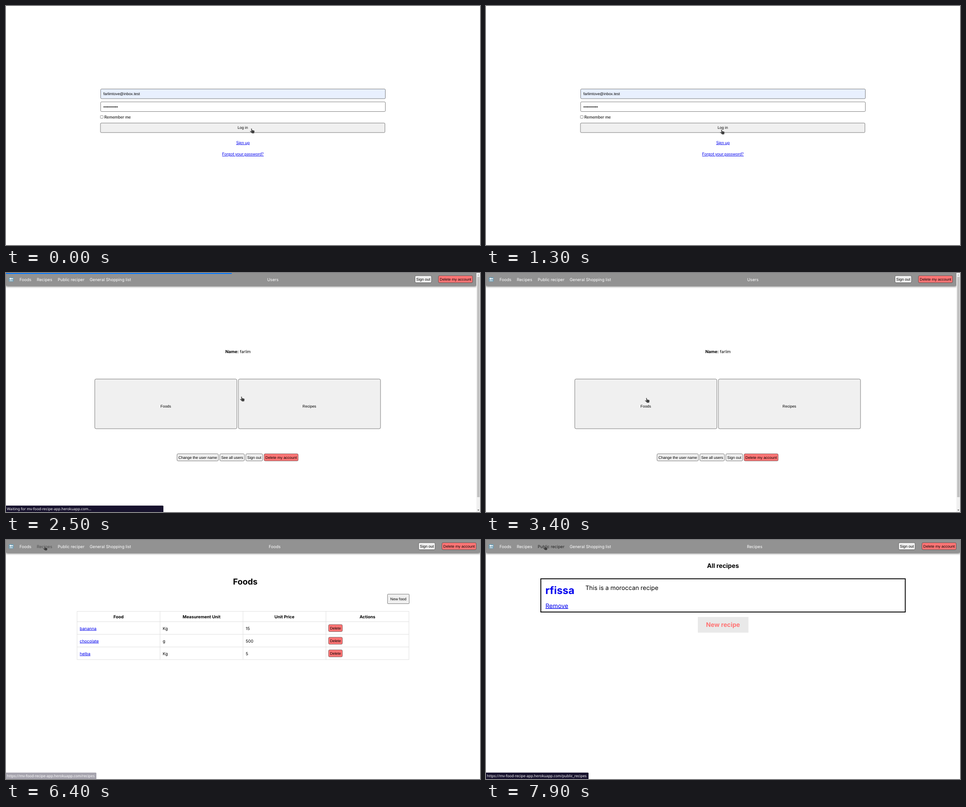
Write an HTML page that moves like this. It is 1054x531 px and loops after 8000 ms.

```html
<!DOCTYPE html>
<html lang="en">
<head>
<meta charset="utf-8">
<title>Recipe app walkthrough</title>
<style>
  html, body { margin: 0; width: 100%; height: 100%; overflow: hidden; background: #fff; }
  svg { display: block; width: 1054px; height: 531px; }
  text { text-rendering: geometricPrecision; white-space: pre; }
  .ui { font: 8.45px "Liberation Sans", Arial, sans-serif; }
  .form { font: 9.3px Lato, sans-serif; }
  .body { font: 9.15px Inter, sans-serif; }
  .strong { font: bold 9.35px Inter, sans-serif; }
  .title { font: bold 18.3px Inter, sans-serif; }
  .large { font: 13.35px Inter, sans-serif; }
  .heading { font: bold 13.75px Inter, sans-serif; }
  .dish { font: bold 23px Inter, sans-serif; }
  .status { font: 8.1px "Noto Sans", sans-serif; }
  .link { fill: #00e; text-decoration: underline; }
</style>
</head>
<body>
<svg id="stage" viewBox="0 0 1054 531">
  <defs>
    <filter id="shadow" x="-5%" y="-50%" width="110%" height="250%" color-interpolation-filters="sRGB">
      <feDropShadow dx="0" dy="1.9" stdDeviation="1.9" flood-color="#000" flood-opacity=".6"/>
    </filter>
  </defs>
</svg>
<script>
const LOOP = 8000;
const RED = '#ff7575', GREY = '#f0f0f0', BLUE = '#00e';
const SITE = 'mv-food-recipe-app.herokuapp.com';
const stage = document.getElementById('stage');

function add(parent, tag, attrs = {}, content) {
  const node = document.createElementNS('http://www.w3.org/2000/svg', tag);
  for (const key in attrs) node.setAttribute(key, attrs[key]);
  if (content !== undefined) node.textContent = content;
  return parent.appendChild(node);
}
const group = (parent = stage) => add(parent, 'g');
const text = (parent, x, y, content, cls, attrs = {}) =>
  add(parent, 'text', { x, y, class: cls, ...attrs }, content);
const centered = (parent, x, y, content, cls, attrs = {}) =>
  text(parent, x, y, content, cls, { 'text-anchor': 'middle', ...attrs });
const box = (parent, x, y, width, height, fill, attrs = {}) =>
  add(parent, 'rect', { x, y, width, height, fill, ...attrs });
const framed = (parent, x, y, w, h, fill, stroke = '#333', rx = 2) =>
  box(parent, x, y, w, h, fill, { stroke, rx, 'stroke-width': 0.64 });

function button(parent, x, y, w, h, label, fill = GREY, rx = 2.5) {
  framed(parent, x, y, w, h, fill, '#333', rx);
  centered(parent, x + w / 2, y + h / 2 + 3, label, 'ui');
}

function loginPage() {
  const page = group();
  framed(page, 210.5, 184.4, 633, 21.5, '#e8f0fe');
  text(page, 216.5, 198, 'farlimtove@inbox.test', 'ui');
  framed(page, 210.5, 213, 633, 21.5, '#fff');
  text(page, 216.5, 226.8, '•'.repeat(11), 'ui');
  framed(page, 209.9, 243.4, 6.2, 6.2, '#fff', '#555', 1.2);
  text(page, 218.6, 250.2, 'Remember me', 'form');
  const submit = framed(page, 210, 260, 632.6, 21.2, GREY);
  centered(page, 526.4, 273.4, 'Log in', 'ui');
  centered(page, 526.9, 306.6, 'Sign up', 'form link');
  centered(page, 526.8, 332, 'Forgot your password?', 'form link');
  return { page, submit };
}

function navBar(parent, width, title) {
  const shift = width - 1054;
  const clip = add(parent, 'svg', { width: 1054, height: 40 });
  box(clip, 0, 0, width, 28, '#929292', { filter: 'url(#shadow)' });
  box(clip, 6, 9.2, 11, 10, '#6f9db3', { rx: 1.5 });
  add(clip, 'path', { d: 'M7.2 12.8 L10.6 10.2 V11.8 H15.6 V13.8 H10.6 V15.4 Z M8 16.5 H15 V17.8 H8 Z', fill: '#fff' });
  const links = [[30, 'Foods'], [68.5, 'Recipes'], [115, 'Public reciper'], [186, 'General Shopping list']]
    .map(([x, label]) => text(clip, x, 17.5, label, 'body', { fill: '#fff' }));
  centered(clip, 597.4 + shift / 2, 17.5, title, 'body', { fill: '#fff' });
  button(clip, 917.5 + shift, 6, 36.6, 15.6, 'Sign out');
  button(clip, 969.5 + shift, 6, 76, 15.6, 'Delete my account', RED);
  return { recipes: links[1], publicLink: links[2] };
}

function homePage() {
  const page = group();
  navBar(page, 1046, 'Users');
  box(page, 1046, 0, 8, 531, '#f1f1f1');
  box(page, 1047.6, 8.5, 5.6, 489.5, '#c1c1c1');
  add(page, 'path', { d: 'M1048.2 5.4 L1050.3 3 L1052.4 5.4 Z', fill: '#a3a3a3' });
  add(page, 'path', { d: 'M1048.2 525.8 L1050.3 528.2 L1052.4 525.8 Z', fill: '#505050' });
  text(page, 487.7, 178, 'Name:', 'strong');
  text(page, 520, 178, 'farlim', 'body');
  button(page, 197.4, 235.6, 316, 110.4, '', GREY, 3);
  button(page, 516.8, 235.6, 316, 110.4, '', GREY, 3);
  centered(page, 355.3, 298.6, 'Foods', 'ui');
  centered(page, 674.6, 298.6, 'Recipes', 'ui');
  button(page, 380.3, 401.7, 92, 15.8, 'Change the user name');
  button(page, 475.4, 401.7, 54.8, 15.8, 'See all users');
  button(page, 533.3, 401.7, 37.4, 15.8, 'Sign out');
  button(page, 573.9, 401.7, 75.8, 15.8, 'Delete my account', RED);
  return { page };
}

function foodsPage() {
  const page = group();
  const nav = navBar(page, 1054, 'Foods');
  centered(page, 532, 99, 'Foods', 'title');
  button(page, 848.3, 120.3, 48.3, 21.2, 'New food', GREY, 1.5);

  const left = 158, column = 184.5, rows = [158.5, 181.5, 209.6, 237.7, 265.8];
  const grid = rows.map(y => `M${left} ${y}h${column * 4}`).join('') +
    [0, 1, 2, 3, 4].map(i => `M${left + i * column} 158.5V265.8`).join('');
  add(page, 'path', { d: grid, stroke: '#ddd', 'stroke-width': 0.9, fill: 'none' });
  ['Food', 'Measurement Unit', 'Unit Price', 'Actions'].forEach((label, i) =>
    centered(page, left + column * (i + 0.5), 173.5, label, 'strong'));
  [['bananna', 'Kg', '15'], ['chocolate', 'g', '500'], ['helba', 'Kg', '5']].forEach((cells, r) => {
    const y = 199.5 + r * 28.1;
    cells.forEach((cell, i) => text(page, left + 6 + i * column, y, cell, i ? 'body' : 'body link'));
    button(page, 717.2, y - 11.6, 30.8, 15.6, 'Delete', RED);
  });
  return { page, ...nav };
}

function recipesPage() {
  const page = group();
  const nav = navBar(page, 1054, 'Recipes');
  centered(page, 527, 61.5, 'All recipes', 'heading');
  box(page, 121.9, 86.2, 810.4, 73.8, 'none', { stroke: '#000', 'stroke-width': 1.9 });
  text(page, 132, 120, 'rfissa', 'dish', { fill: BLUE });
  text(page, 221, 111, 'This is a moroccan recipe', 'large');
  text(page, 132.2, 150.5, 'Remove', 'large link');
  box(page, 471, 171, 112.6, 34.8, '#e9e9e9');
  centered(page, 527, 193.4, 'New recipe', 'heading', { fill: RED });
  return { page, ...nav };
}

const login = loginPage(), home = homePage(), foods = foodsPage(), recipes = recipesPage();

const progress = box(stage, 0, 0, 0, 2, '#0076ff');
const status = group();
const statusBox = box(status, -4, 516.8, 0, 20, '#17122d', { rx: 1.5 });
const statusText = text(status, 2, 527.2, '', 'status', { fill: '#fff' });

const pointers = {
  hand: 'M2.9 .9 Q3.9 -.1 4.8 .9 L5.2 4 L9.4 4.9 Q10.7 5.3 10.6 6.8 L10.3 9.2 L9.6 11.2 H4.8 L3.9 9.8 L.5 7 Q.3 5.7 1.7 5.9 L3.5 6.9 Z',
  arrow: 'M.3 .3 L.3 9 L2.4 7.1 L4 10.8 L5.6 10.1 L4.1 6.6 L6.8 6.4 Z'
};
const cursor = add(stage, 'path', { fill: '#3f3f3f', stroke: '#ddd', 'stroke-width': 0.45, 'stroke-opacity': 0.8 });

// Each track lists [start time, ...values]; values hold until the next entry.
const pageTrack = [[0, login], [2400, home], [3800, foods], [6900, recipes]];
const cursorTrack = [
  [0, 542, 271.7, 'hand'], [400, 538, 272.2, 'hand'], [500, 530, 273, 'hand'],
  [600, 523, 273.7, 'hand'], [700, 519.8, 274, 'hand'],
  [3100, 355, 277.7, 'hand'], [3400, 353, 277, 'hand'],
  [3800, 357, 278, 'arrow'], [4200, 432, 199, 'arrow'], [4500, 339, 109, 'arrow'],
  [4700, 306, 188, 'arrow'], [5000, 306, 204, 'arrow'], [5500, 210, 67.5, 'arrow'],
  [5700, 167, 38.5, 'arrow'], [5900, 138, 13, 'hand'], [6200, 93, 16, 'arrow'],
  [6400, 81.7, 12.4, 'hand'], [7400, 107, 17, 'arrow'], [7700, 126.2, 11.6, 'hand']
];
const statusTrack = [
  [0, 0, 0, ''],
  [2400, 1, 350, `Waiting for ${SITE}...`],
  [2700, 0.4, 350, `Waiting for ${SITE}...`],
  [2900, 0, 0, ''],
  [6400, 0.38, 201, `https://${SITE}/recipes`],
  [6700, 1, 201, `https://${SITE}/recipes`],
  [7700, 1, 228, `https://${SITE}/public_recipes`]
];
const recipesTrack = [[0, '#fff'], [6400, '#505050'], [6700, '#222'], [7700, '#fff']];
const publicTrack = [[0, '#fff'], [5900, '#505050'], [6200, '#fff'], [7700, '#505050'], [7900, '#222']];
const at = (track, t) => track.findLast(entry => entry[0] <= t).slice(1);

function progressWidth(t) {
  if (t < 1800 || t >= 2700) return 0;
  if (t >= 2500) return 502;
  if (t >= 2400) return 290;
  const p = Math.min(1, (t - 1700) / 500);
  return 105 * (1 - (1 - p) ** 2) + Math.max(0, t - 2200) / 40;
}

function draw(time) {
  const t = Math.floor(time % LOOP / 100) * 100;
  const [shown] = at(pageTrack, t);
  for (const view of [login, home, foods, recipes])
    view.page.setAttribute('display', view === shown ? 'inline' : 'none');
  login.submit.setAttribute('fill', t === 1200 ? '#f5f5f5' : GREY);

  for (const view of [foods, recipes]) {
    view.recipes.setAttribute('fill', at(recipesTrack, t)[0]);
    view.publicLink.setAttribute('fill', at(publicTrack, t)[0]);
  }

  progress.setAttribute('width', progressWidth(t));
  const [opacity, width, label] = at(statusTrack, t);
  status.setAttribute('opacity', opacity);
  statusBox.setAttribute('width', width + 4);
  statusText.textContent = label;

  const [x, y, kind] = at(cursorTrack, t);
  cursor.setAttribute('d', pointers[kind]);
  cursor.setAttribute('transform', `translate(${x} ${y})`);
}

const start = performance.now();
function tick() {
  draw(performance.now() - start);
  requestAnimationFrame(tick);
}
tick();
</script>
</body>
</html>
```
